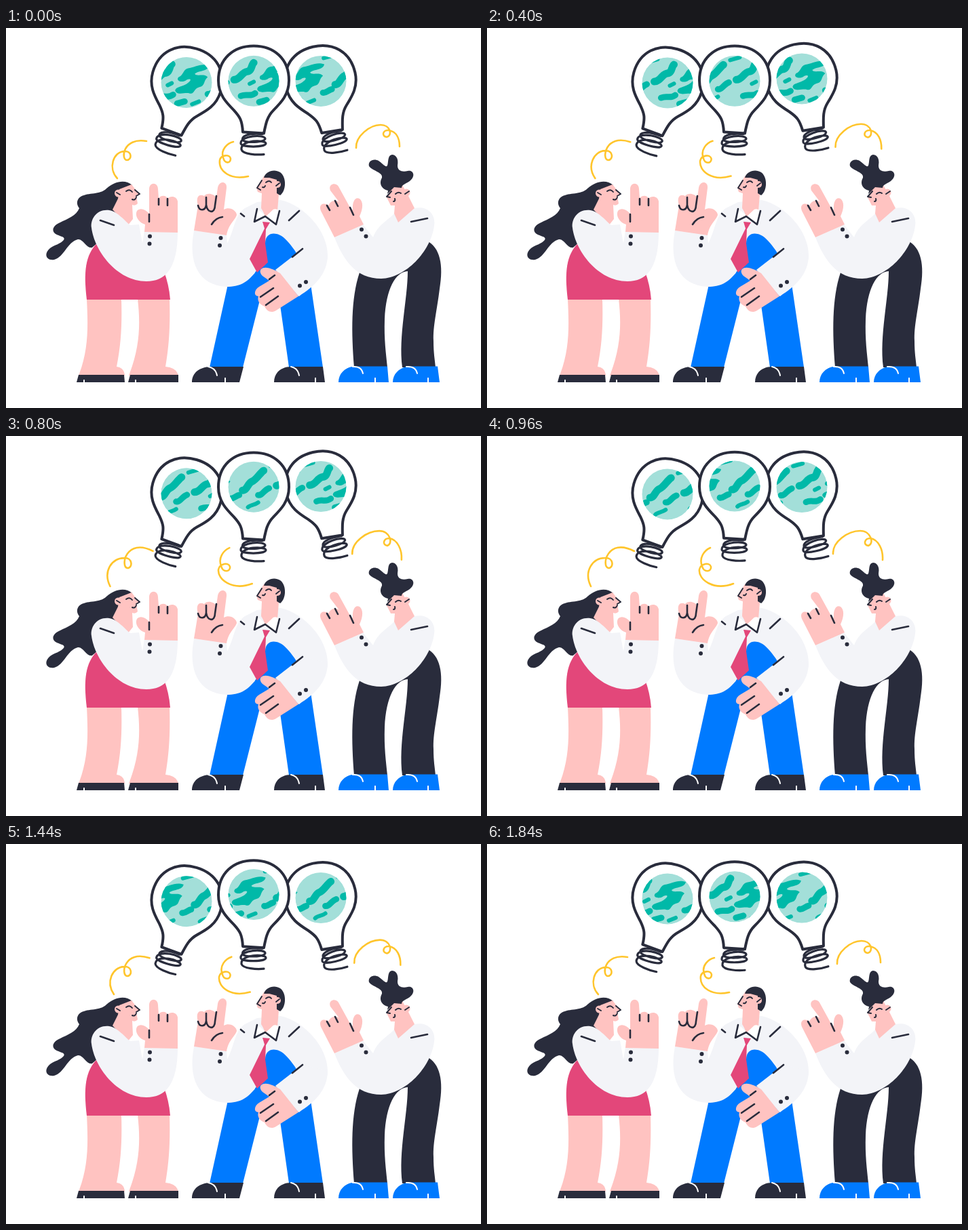
Recreate the animation shown at these times as an HTML page. Size 700 by 561 pixels, loop 1.92 s.

```html
<!DOCTYPE html>
<html lang="en">
<head>
<meta charset="utf-8">
<title>Bright ideas</title>
<style>
  html, body { margin: 0; width: 100%; height: 100%; overflow: hidden; background: #fff; }
  svg { display: block; width: 100%; height: 100%; }
  .skin { fill: #ffc3c1; }
  .dark { fill: #292c3c; }
  .shirt { fill: #f3f4f8; }
  .pink { fill: #e3477a; }
  .blue { fill: #007aff; }
  .ink, .shine, .swirl { fill: none; stroke-linecap: round; stroke-linejoin: round; }
  .ink { stroke: #292c3c; stroke-width: 2.6; }
  .fine { stroke-width: 2; }
  .coil { stroke-width: 3.2; }
  .shine { stroke: #fff; stroke-width: 2; }
  .swirl { stroke: #ffc52c; stroke-width: 2.6; }
  .land { fill: #00b9a8; }
  .streak { fill: none; stroke: #00b9a8; stroke-linecap: round; stroke-linejoin: round; }
</style>
</head>
<body>
<svg viewBox="0 0 700 561">
  <defs>
    <clipPath id="disc"><circle r="37.5"/></clipPath>
    <g id="land">
      <path class="land" d="M27 -25 C14 -29 6 -22 -4 -21 C-12 -19 -10 -11 -18 -8 C-23 -2 -12 1 -6 -4 C1 -7 2 -3 -6 2 C-14 7 -22 6 -23 12 C-20 20 -8 14 -2 16 C6 18 4 9 12 7 C22 5 18 -2 25 -8 C20 -14 8 -8 6 -13 C12 -18 25 -16 27 -25 Z"/>
      <path class="streak" stroke-width="11" d="M-57 -2 C-48 -2 -46 -13 -38 -14 S-32 -24 -28 -27 M43 5 C50 5 50 -5 57 -8 S68 -20 74 -24"/>
      <path class="streak" stroke-width="9" d="M-47 22 C-38 18 -34 24 -26 18 M-20 31 L-9 28 M25 17 C30 18 33 13 38 12 M66 12 C72 13 75 4 82 2"/>
      <path class="streak" stroke-width="6" d="M26 -34 L41 -38 M-66 -31 L-52 -35 M2 32 L12 28 M51 30 C55 26 61 27 66 23 M-34 4 L-28 1"/>
    </g>
    <g id="glass">
      <path fill="#fff" stroke="#292c3c" stroke-width="4" stroke-linejoin="round" d="M-16 75 C-17 58 -20 53 -29 43 C-40 32 -52 20 -52 -1 C-52 -33 -30 -52 0 -52 C30 -52 52 -33 52 -1 C52 20 40 32 29 43 C20 52 18 62 15 77 Z"/>
      <path class="ink coil" d="M13 78 C-10 76 -19 82 -16 87 C-12 91 15 91 17 85 C17 78 -20 80 -19 92 C-18 98 17 98 18 92 C18 86 -20 86 -18 101 C-16 108 5 109 15 108"/>
    </g>
  </defs>

  <g id="bulbs"></g>
  <g id="swirls"></g>

  <!-- woman -->
  <path class="dark" d="M186 232 C176 223 160 226 148 237 C138 247 122 242 110 249 C103 254 104 261 108 266 C104 277 90 282 80 287 C68 292 67 300 73 304 C80 308 88 308 85 313 C80 319 72 320 65 325 C55 333 59 344 71 342 C86 338 90 316 106 312 C114 311 118 326 127 324 L134 318 L170 275 Z"/>
  <path class="skin" d="M167 238 L185 231 L196 245 L192 248 L194 259 Q191 263 186 261 L187 282 L179 292 L157 268 L165 252 Z"/>
  <circle class="skin" cx="165.500" cy="244" r="5.500"/>
  <path class="ink fine" d="M163 243 L168 246 M177 241 Q182 237 186 242 M190 239 L197 245 L192 248 M186 253 Q190 255 192 250"/>
  <path class="skin" d="M119 400 C121 440 122 475 107 513 H175 Q174 501 163 500 C170 465 171 435 170 400 Z M194 400 C198 435 198 470 181 513 H254 Q251 501 235 500 C241 465 242 435 241 400 Z"/>
  <path class="pink" d="M134 318 C117 335 114 360 119 401 H242 Q240 378 233 360 L190 340 Z"/>
  <path class="dark" d="M107 512 H174 L175 523 H104 Z M183 512 H254 V523 H180 Z"/>
  <path class="shine" d="M115 520 V523 M191 520 V523"/>
  <path class="shirt" d="M152 269 C134 267 124 282 126 295 C130 328 163 374 207 374 C235 374 253 355 253 301 L204 299 L201 318 L196 290 L183 291 C176 286 165 271 152 269 Z"/>
  <path class="skin" d="M204 301 L205 290 C196 288 189 277 193 270 C197 265 205 267 211 274 L211 238 C211 227 224 227 224 238 L225 252 C227 247 236 246 238 252 C242 247 252 248 253 256 L253 302 Z"/>
  <path class="ink" d="M225 252 V261 M238 252 V262 M211 275 V286 M139 284 L159 291"/>
  <path class="dark" d="M209 307.500 a3 3 0 1 0 6 0 a3 3 0 1 0 -6 0 M208.500 318.500 a3 3 0 1 0 6 0 a3 3 0 1 0 -6 0"/>

  <!-- man in the middle -->
  <path class="blue" d="M328 374 L300 501 H349 L377 390 L402 395 L417 501 H467 L449 378 L420 340 Z"/>
  <path class="dark" d="M274 523 C274 507 288 500 303 500 H350 L344 523 Z M395 523 C395 507 408 500 420 500 H467 L470 523 Z"/>
  <path class="shine" d="M298 500 Q309 502 311 513 M420 500 Q430 502 432 513 M323 517 V523 M456 517 V523"/>
  <path class="shirt" d="M277 299 L325 305 L326 318 C336 300 337 276 352 266 L370 257 L405 254 C440 262 474 300 474 335 C474 350 465 365 452 378 L432 396 L400 357 L368 360 C355 376 345 382 325 382 C283 380 268 345 277 299 Z"/>
  <path class="blue" d="M382 318 C382 300 400 300 411 311 C419 319 427 329 432 340 L420 380 L376 390 L367 361 L382 340 Z"/>
  <path class="shirt" d="M437 326 L397 357 L431 396 C455 382 474 362 474 335 Z"/>
  <path class="skin" d="M380 219 L369 236 L371 242 L377 244 L376 266 L383 278 L400 270 L402 246 L403 226 L390 215 Z"/>
  <path class="dark" d="M380 221 C382 212 395 207 404 213 C414 220 413 241 404 247 L399 244 L399 224 L388 221 Z"/>
  <circle class="skin" cx="400" cy="231" r="5"/>
  <path class="ink fine" d="M398 233 L403 229 M383 228 Q388 224 391 228 M377 225 L370 236 L375 239 M378 235 Q381 236 382 233"/>
  <path d="M370 266 L366 286 L382 279 L398 290 L403 270 Q395 262 382 277 Z" fill="#fff"/>
  <path class="skin" d="M376 262 L382 279 L400 262 Z"/>
  <path class="ink" d="M370 267 L366 286 L382 278 L398 290 L403 270"/>
  <path class="pink" d="M378 286 L389 287 L383 297 L382 318 L386 346 L370 361 L359 341 L381 296 Z"/>
  <path class="skin" d="M277 299 L283 262 C279 249 285 244 292 248 C297 242 306 245 310 250 L312 236 C314 225 326 226 325 236 L321 268 C330 263 340 270 340 276 C337 285 328 289 325 306 Z"/>
  <path class="ink" d="M283 262 C285 271 294 270 295 261 V250 M295 261 C297 274 308 274 308 262 L310 248 M303 290 Q309 280 319 279 M346 274 L351 278 M417 284 L432 270 M422 338 L437 326"/>
  <path class="skin" d="M376 356 C382 350 396 357 404 362 L431 396 L398 417 C390 422 384 417 381 411 C373 408 370 402 372 396 C365 396 365 387 373 382 L388 373 L378 366 C374 362 374 358 376 356 Z"/>
  <path class="ink" d="M388 371 L396 365 M375 397 L394 384 M383 409 L401 396"/>
  <path class="dark" d="M313.500 310 a3 3 0 1 0 6 0 a3 3 0 1 0 -6 0 M312 321 a3 3 0 1 0 6 0 a3 3 0 1 0 -6 0 M430 380.500 a3 3 0 1 0 6 0 a3 3 0 1 0 -6 0 M439 375 a3 3 0 1 0 6 0 a3 3 0 1 0 -6 0"/>

  <!-- man on the right -->
  <path class="dark" d="M620 314 C640 324 645 350 639 385 C635 418 629 440 630 462 C630 480 632 490 633 501 H584 C578 455 592 400 592 359 C574 360 560 385 558 430 C557 460 560 480 562 501 H513 C509 450 508 400 521 361 L560 340 Z"/>
  <path class="blue" d="M490 523 C490 508 503 499 516 499.500 H562 L564 523 Z M570 523 C570 508 584 499 597 499.500 H636 L639 523 Z"/>
  <path class="shine" d="M511 500 Q524 499 526 510 M590 500 Q604 499 606 510 M544 517 V523 M622 517 V523"/>
  <path class="shirt" d="M484 309 L526 290 L541 309 C548 290 562 285 573 273 L602 266 C618 262 634 272 631 292 C626 330 589 369 553 370 C520 370 500 350 484 309 Z"/>
  <path class="skin" d="M569 234 L561 250 L567 262 L573 262 L572 274 L578 287 L602 266 L592 246 L584 232 Z"/>
  <path class="dark" d="M583 236 C583 230 592 230 597 224 C604 217 599 209 592 211 C584 213 577 211 577 203 C579 192 574 187 569 187 C562 188 564 197 562 203 C560 207 555 200 549 196 C542 192 533 196 535 204 C540 211 556 213 554 221 C549 230 554 238 563 240 L562 245 L572 235 Z"/>
  <circle class="skin" cx="590" cy="243" r="5.500"/>
  <path class="ink fine" d="M588 245 L594 241 M574 245 Q578 241 582 244 M568 241 L561 249 L566 250 M571 256 Q574 256 573 252"/>
  <path class="skin" d="M484 309 L464 270 C460 260 469 257 475 262 C479 254 486 253 491 257 L478 240 C474 230 486 227 490 234 L507 265 L511 269 C510 257 514 249 521 252 C527 257 526 267 521 278 L527 290 Z"/>
  <path class="ink" d="M473 262 L477 269 M485 255 L489 263 M507 265 L512 276 M597 286 L621 281"/>
  <path class="dark" d="M521 297.500 a3 3 0 1 0 6 0 a3 3 0 1 0 -6 0 M527.500 307.500 a3 3 0 1 0 6 0 a3 3 0 1 0 -6 0"/>
</svg>
<script>
const LOOP = 1920, STEP = 80, MAP_WIDTH = 150;
const wave = (t, peak) => Math.cos((t - peak) / LOOP * 2 * Math.PI);
const layer = id => document.getElementById(id);

// The middle bulb comes last so that it overlaps its neighbours.
const bulbs = [
  { x: 266, y: 83.2, sway: 3.1, lift: 3.1, peak: 1110, tilt: 16.5, centred: 1840 },
  { x: 464, y: 77, sway: 2.9, lift: 2.7, peak: 1600, tilt: -13, centred: 280 },
  { x: 365, y: 76.2, sway: 2.7, lift: 1.7, peak: 200, tilt: 0, centred: 1560 }
];

// Each swirl morphs from a short curve to a wide one.
const parse = d => d.split(' ').map(s => {
  const [, command, value] = s.match(/([A-Z]?)(.+)/);
  return { command, value: +value };
});
const swirls = [
  ['M164 222 C150 207 158 183 174 182 C186 181 186 195 178 195 C169 194 172 161 207 167',
   'M153 222 C142 199 156 180 174 180 C187 179 187 195 179 195 C168 193 177 149 217 170'],
  ['M335 168 C326 170 316 180 320 191 C322 201 331 200 331 193 C330 186 317 187 315 195 C313 211 330 225 357 219',
   'M329 165 C320 169 312 180 317 192 C319 202 331 201 330 193 C328 186 315 188 313 197 C311 212 334 229 363 218'],
  ['M516 177 C515 160 536 143 552 143 C567 143 570 159 561 161 C553 160 555 150 564 151 C576 153 580 164 580 175',
   'M510 174 C509 156 532 140 550 140 C566 140 571 159 562 162 C554 161 556 151 565 151 C577 153 584 168 583 183']
].map(pair => pair.map(parse));

layer('bulbs').innerHTML = bulbs.map(b => `
  <g><use href="#glass" transform="rotate(${b.tilt})"/></g>
  <g><g clip-path="url(#disc)"><circle r="38" fill="#a3dfd9"/><g>
    ${[-1, 0, 1].map(n => `<use href="#land" x="${n * MAP_WIDTH}"/>`).join('')}
  </g></g></g>`).join('');
layer('swirls').innerHTML = swirls.map(() => '<path class="swirl"/>').join('');

function draw(t) {
  const parts = layer('bulbs').children;
  bulbs.forEach((b, i) => {
    const w = wave(t, b.peak);
    const glass = parts[2 * i], globe = parts[2 * i + 1];
    glass.setAttribute('transform', `translate(${b.x} ${b.y + b.lift * w + (b.tilt ? 0 : 1)})`);
    globe.setAttribute('transform', `translate(${b.x} ${b.y + b.sway * w})`);
    const turn = ((t - b.centred) / LOOP + 1.5) % 1 - 0.5;
    globe.firstChild.lastElementChild.setAttribute('transform', `translate(${turn * MAP_WIDTH} 0)`);
  });
  const k = 0.5 + 0.5 * wave(t, 930);
  swirls.forEach(([short, wide], i) => {
    const d = short.map(({ command, value }, j) => command + (value + (wide[j].value - value) * k).toFixed(2));
    layer('swirls').children[i].setAttribute('d', d.join(' '));
  });
}

const start = performance.now();
function tick() {
  const t = (performance.now() - start) % LOOP;
  draw(Math.floor(t / STEP) * STEP);
  requestAnimationFrame(tick);
}
tick();
</script>
</body>
</html>
```
